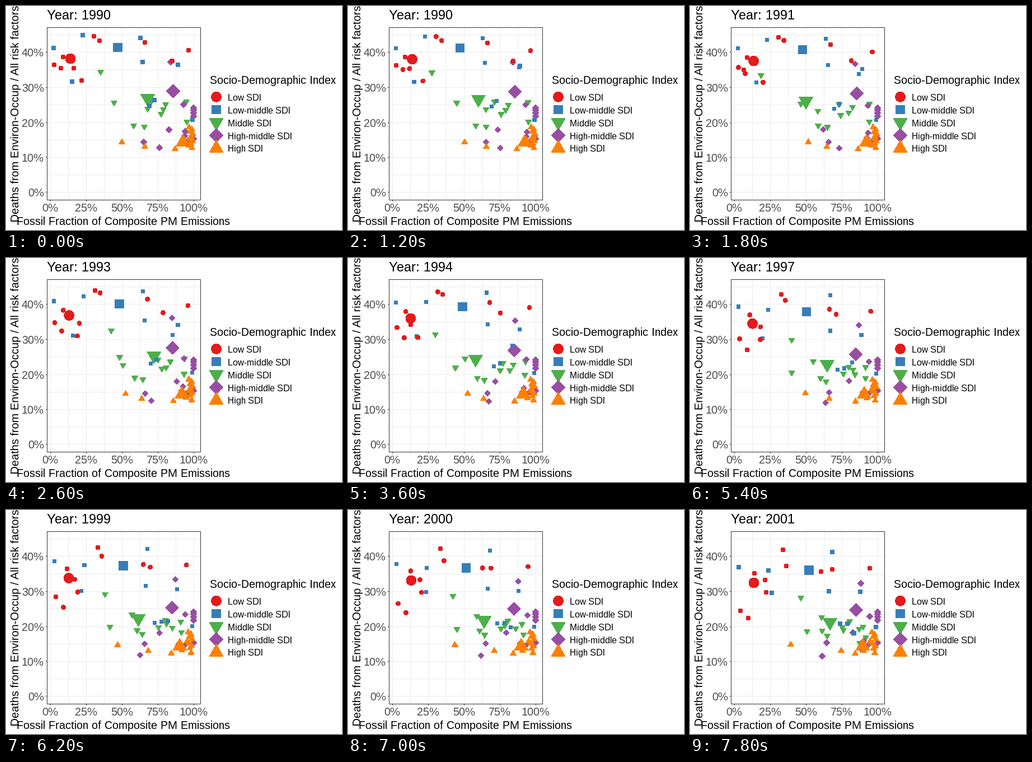
These frames come from a looping animation (600 by 400 pixels, 8000 ms). A matplotlib script:

```python
import numpy as np
import matplotlib.pyplot as plt
from matplotlib.animation import FuncAnimation
from matplotlib.collections import PolyCollection
from matplotlib.patches import PathPatch
from matplotlib.textpath import TextPath
from matplotlib.transforms import Affine2D

plt.rcParams.update({"font.family": "Liberation Sans",
                     "text.hinting": "native", "text.hinting_factor": 1})

W, H, DPI = 600, 400, 100
HOLD, STEPS = 5, 34           # held ticks, then three steps per year
SMALL, BIG = 4.0, 9.2
LEFT, RIGHT, TOP, BOTTOM = 73, 347, 38, 346

turn = np.linspace(0, 2 * np.pi, 48, endpoint=False)
TRIANGLE = np.array([(0, -1.166), (1.347, 1.166), (-1.347, 1.166)])
SHAPES = {
    "Low": 0.95 * np.column_stack([np.cos(turn), np.sin(turn)]),
    "Low-middle": 0.886 * np.array([(-1, -1), (1, -1), (1, 1), (-1, 1)]),
    "Middle": TRIANGLE * (1, -1),
    "High-middle": 1.253 * np.array([(0, -1), (1, 0), (0, 1), (-1, 0)]),
    "High": TRIANGLE,
}
COLORS = {"Low": "#E41A1C", "Low-middle": "#377EB8", "Middle": "#4DAF4A",
          "High-middle": "#984EA3", "High": "#FF7F00"}
dots = {name: [] for name in SHAPES}


def swing_at(n):
    """Shared sideways zigzag of the restless dots."""
    return np.interp(n, (0, 3, 8, 13, 19, 26, STEPS), (0, -2.5, 0.5, -1, 0, -0.6, 0))


def move(name, start, end, bow=(0, 0), swing=0, size=SMALL):
    """Add a dot going from start to end, arched by bow at half way."""
    dots[name].append((np.array(start), np.array(end), np.array(bow), swing, size))


def place(n, start, end, bow, swing):
    t = n / STEPS
    return start + (end - start) * t + bow * 4 * t * (1 - t) + (swing * swing_at(n), 0)


g = "Low"
move(g, (157, 54), (166, 71))
move(g, (167, 62), (172, 100), (0, -12))
move(g, (248, 65), (234, 110), (11, -3))
move(g, (326, 79), (321, 104))
move(g, (102, 91), (115, 113), (-4, -4))
move(g, (86, 105), (90, 180), (0, -10))
move(g, (98, 111), (104, 193))
move(g, (121, 111), (134, 125), (0, 3), swing=14)
move(g, (135, 133), (136, 147), (-11, 4))
move(g, (297, 98), (254, 106), (-9, -3))
move(g, (115, 94), (114, 130), (-3, 0), size=BIG)

g = "Low-middle"
move(g, (85, 75), (87, 102), (0, -6))
move(g, (137, 52), (140, 108), (1, 5))
move(g, (240, 57), (254, 75), (2, -2))
move(g, (244, 100), (248, 145), (4, 1))
move(g, (307, 105), (304, 146), (1, 7))
move(g, (307, 105), (293, 220), (-9, 8))
move(g, (118, 135), (146, 148), (-7, 0))
move(g, (265, 168), (281, 203), (0, 7))
move(g, (256, 178), (268, 203), (0, 6))
move(g, (333, 203), (332, 209))
move(g, (199.5, 74), (212.5, 107.5), size=BIG)

g = "Middle"
move(g, (169, 119), (198, 158), (0, 4), swing=24)
move(g, (193, 174), (235, 193))
move(g, (253, 185), (209, 218), (-47, 0))
move(g, (260, 171), (285, 200), (8, 7))
move(g, (281, 186), (302, 214), (0, 6))
move(g, (285, 177), (272, 211), (16, 2))
move(g, (277, 194), (274, 216), swing=4)
move(g, (322, 172), (309, 210))
move(g, (323, 208), (314, 229), (-4, -6))
move(g, (228, 215), (236, 217))
move(g, (247, 217), (245, 226), (-3, -1))
move(g, (316, 246), (303, 239), (6, 5))
move(g, (253, 168.5), (250, 204), (0, 2), swing=24, size=BIG)

g = "High-middle"
for y in (182, 186, 191, 197, 237):
    move(g, (335, y), (335, y))
move(g, (294, 100), (305, 131))
move(g, (317, 176), (321, 190))
move(g, (291, 221), (291, 219), swing=28)
move(g, (246, 243), (244, 237), (4, 1))
move(g, (274, 253), (236, 261), (-8, 0))
move(g, (320, 224), (304, 247))
move(g, (319, 232), (310, 234), (-5, 7))
move(g, (327, 239), (318, 241))
move(g, (298.5, 152), (296.5, 178.5), (-1, 3), size=BIG)

g = "High"
move(g, (207, 242), (180, 239), (18, 0))
move(g, (248, 250), (270, 250), (-15, 0))
move(g, (302, 254), (295, 255), (-2, 0))
for k in range(10):           # the stack near 100 %; every fourth one drifts away
    x, y = 327 + 5 * k % 8, 215 + 4.1 * k
    move(g, (x, y), (x - 2 - (1.9 * k if k % 4 == 0 else 0), y + 2))
move(g, (316, 240), (308.5, 240), size=BIG)

fig = plt.figure(figsize=(W / DPI, H / DPI), dpi=DPI, facecolor="white")
ax = fig.add_axes([0, 0, 1, 1])
ax.set(xlim=(0, W), ylim=(H, 0))
ax.axis("off")


def line(xs, ys, color, z=1):
    ax.plot(np.add(xs, 0.5), np.add(ys, 0.5), color=color, lw=0.72, zorder=z,
            snap=False, solid_capstyle="projecting", solid_joinstyle="miter")


def write(x, y, text, px, color="black", ha="left"):
    return ax.text(x, y, text, fontsize=px * 72 / DPI, color=color, ha=ha, va="baseline")


def layer(name, verts=(), z=3):
    group = PolyCollection(verts, facecolors=COLORS[name], linewidths=0,
                           antialiaseds=False, zorder=z)
    ax.add_collection(group, autolim=False)
    return group


# Panel, grid and axes
INK, GRID, GREY = "#333333", "#EBEBEB", "#4D4D4D"
for k in range(9):
    x = 79 + 32 * k
    line((x, x), (TOP, BOTTOM), GRID)
    if k % 2 == 0:
        line((x, x), (BOTTOM, BOTTOM + 2), INK)
        write(x, 367, f"{k * 25 // 2}%", 20, GREY, "center")
for k in range(10):
    y = round(332.5 - 31.25 * k)
    line((LEFT, RIGHT), (y, y), GRID)
    if k % 2 == 0:
        line((LEFT - 2, LEFT), (y, y), INK)
        write(68, y + 8, f"{k * 5}%", 20, GREY, "right")
line((LEFT, RIGHT, RIGHT, LEFT, LEFT), (TOP, TOP, BOTTOM, BOTTOM, TOP), INK, 9)

write(209.5, 391, "Fossil Fraction of Composite PM Emissions", 20, ha="center")
title = write(73, 24, "Year: 1990", 24)
label = TextPath((0, 0), "Deaths from Environ-Occup / All risk factors", size=20)
upright = Affine2D([[0, -1, 22], [-1, 0, 386.5], [0, 0, 1]])
ax.add_patch(PathPatch(upright.transform_path(label), fc="black", lw=0))

# Legend
write(364, 139, "Socio-Demographic Index", 20)
shift = {"Middle": 3.3, "High": -3.3}
for k, name in enumerate(SHAPES):
    y = 162.3 + 22.9 * k
    layer(name, [SHAPES[name] * BIG + (375.5, y + shift.get(name, 0))])
    write(396, round(y + 6.5), f"{name} SDI", 16)

order = ("Middle", "High-middle", "Low-middle", "Low", "High")
layers = {name: layer(name, z=3 + k) for k, name in enumerate(order)}


def update(i):
    n = max(0, i - HOLD)
    for name, group in layers.items():
        group.set_verts([SHAPES[name] * size + place(n, *path)
                         for *path, size in dots[name]])
    title.set_text(f"Year: {round(1990 + n / 3)}")
    return [*layers.values(), title]


anim = FuncAnimation(fig, update, frames=HOLD + STEPS + 1, interval=200,
                     init_func=lambda: update(0), repeat=True, repeat_delay=0)
plt.show()
```
